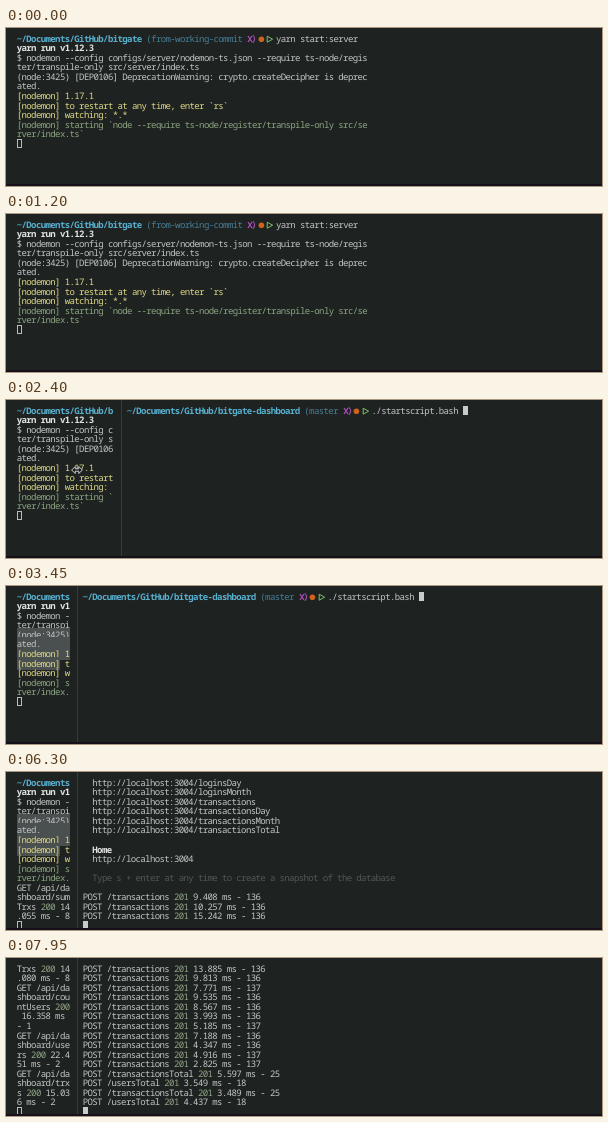
Animation of 596x158 px, one loop 8000 ms. Source, as an HTML page:

```html
<!DOCTYPE html>
<html lang="en">
<head>
<meta charset="utf-8">
<title>Split terminal</title>
<style>
html, body { margin: 0; width: 100%; height: 100%; overflow: hidden; background: #1e2322; }
#stage { position: relative; width: 596px; height: 158px; overflow: hidden; background: #1e2322; }
.pane {
  position: absolute; top: 5.7px; white-space: pre; color: #c3c7c4;
  font: 9px "Noto Sans Mono", "DejaVu Sans Mono", monospace;
  letter-spacing: -.6px;
  text-rendering: geometricPrecision; font-variant-ligatures: none;
}
.pane div { height: 9.55px; line-height: 9.55px; }
#left { left: 10.7px; }
#divider { position: absolute; top: 0; width: 1px; height: 156px; background: #363c3c; }
#edge { position: absolute; left: 0; top: 156px; width: 596px; height: 2px; background: #15101a; }
#pointer { position: absolute; left: -6px; top: 65px; }
.path { color: #58b0cf; font-weight: 600; }
.branch { color: #477f98; }
.bold { color: #e2e4e2; font-weight: 700; }
.yellow { color: #e0da88; font-weight: 500; }
.green { color: #8da581; }
.status { color: #93a587; }
.dim { color: #525858; }
.sel { background: #4a4f4f; }
.icon, .block, .hollow { display: inline-block; width: 4.8px; height: 9px; vertical-align: top; }
.icon svg { display: block; overflow: visible; }
.block { width: 5.5px; background: #c9cdca; }
.hollow { box-sizing: border-box; width: 5.5px; border: 1px solid #b9bdba; }
</style>
</head>
<body>
<div id="stage">
  <div id="left" class="pane"></div>
  <div id="right" class="pane"></div>
  <div id="divider"></div>
  <div id="edge"></div>
  <svg id="pointer" width="12" height="10" viewBox="0 0 12 10">
    <path d="M.7 5 4.2 1.5V3.8H7.8V1.5L11.3 5 7.8 8.5V6.2H4.2V8.5Z" fill="#161919" stroke="#e4e6e4" stroke-width=".9"/>
  </svg>
</div>
<script>
const LOOP = 8000, STEP = 150, CELL = 4.8, ROWS = 16, RIGHT_EDGE = 692;
const $ = id => document.getElementById(id);

// A line is a list of cells: [character, class names].
const seg = (text, cls = '') => [...text].map(ch => [ch, cls]);
const blank = () => [];

const svg = shape => `<svg width="5" height="9" fill="none">${shape}</svg>`;
const ICONS = {
  cross: svg('<path d="M1 2 5 8M5 2 1 8" stroke="#b04bb8" stroke-width="1.3"/>'),
  paren: svg('<path d="M.8 1Q4.4 4.9 .8 9" stroke="#9a52ab" stroke-width="1.1"/>'),
  dot: svg('<circle cx="4.4" cy="5.2" r="2.8" fill="#d0621c"/>'),
  arrow: svg('<path d="M1.2 2.2 6.6 5.2 1.2 8.2Z" stroke="#79c069" stroke-width="1"/>')
};
const icon = name => [['', 'icon ' + name]];

const prompt = (path, branch, command) => [
  ...seg(path, 'path'), ...seg(' '), ...seg('(' + branch, 'branch'), ...seg(' '),
  ...icon('cross'), ...icon('paren'), ...icon('dot'), ...seg(' '),
  ...icon('arrow'), ...seg(' '), ...seg(command)
];

const wrap = (cells, cols) => {
  const rows = [];
  for (let i = 0; i < cells.length; i += cols) rows.push(cells.slice(i, i + cols));
  return rows.length ? rows : [[]];
};

const rowHtml = cells => {
  let html = '', run = '', last = '';
  const flush = () => { if (run) html += `<span class="${last}">${run}</span>`; run = ''; };
  for (const [ch, cls] of cells) {
    if (ch === '') {
      flush();
      html += `<span class="${cls}">${ICONS[cls.split(' ')[1]] || ''}</span>`;
      continue;
    }
    if (cls !== last) { flush(); last = cls; }
    run += ch;
  }
  flush();
  return `<div>${html}</div>`;
};

const show = (pane, rows) => { pane.innerHTML = rows.slice(-ROWS).map(rowHtml).join(''); };

const select = (cells, count) => {
  const padded = [...cells, ...seg(' '.repeat(Math.max(0, count - cells.length)))];
  return padded.map(([ch, cls], i) => [ch, i < count ? cls + ' sel' : cls]);
};

// Left pane: dev server
const server = [
  prompt('~/Documents/GitHub/bitgate', 'from-working-commit', 'yarn start:server'),
  seg('yarn run v1.12.3', 'bold'),
  seg('$ nodemon --config configs/server/nodemon-ts.json --require ts-node/regis'),
  seg('ter/transpile-only src/server/index.ts'),
  seg('(node:3425) [DEP0106] DeprecationWarning: crypto.createDecipher is deprec'),
  seg('ated.'),
  seg('[nodemon] 1.17.1', 'yellow'),
  seg('[nodemon] to restart at any time, enter `rs`', 'yellow'),
  seg('[nodemon] watching: *.*', 'yellow'),
  seg('[nodemon] starting `node --require ts-node/register/transpile-only src/se', 'green'),
  seg('rver/index.ts`', 'green')
];
const SELECTION = { 4: 11, 5: 11, 6: 11, 7: 9 };

const requests = [
  ['sumTrxs', '14.055 ms - 8'], ['users', '27.877 ms - 357'],
  ['jwts', '30.516 ms - 2'], ['trxs', '32.310 ms - 2147'],
  ['sumTrxs', '14.080 ms - 8'], ['countUsers', '16.358 ms - 1'],
  ['users', '22.451 ms - 2'], ['trxs', '15.036 ms - 2']
].flatMap(([name, timing]) => wrap([
  ...seg(`GET /api/dashboard/${name} `), ...seg('200', 'status'), ...seg(' ' + timing)
], 11));

// Right pane: mock API
const post = (route, ms, size) => [
  ...seg(`POST /${route} `), ...seg('201', 'status'), ...seg(` ${ms} ms - ${size}`)
];
const routes = 'usersDay usersMonth usersTotal logins loginsDay loginsMonth transactions transactionsDay transactionsMonth transactionsTotal';
const timings = '9.408 10.257 15.242 11.679 13.885 9.813 7.771 9.535 8.567 3.993 5.185 7.188 4.347 4.916 2.825';
const api = [
  prompt('~/Documents/GitHub/bitgate-dashboard', 'master', './startscript.bash '),
  ...routes.split(' ').map(r => seg('  http://localhost:3004/' + r)),
  blank(),
  seg('  Home', 'bold'),
  seg('  http://localhost:3004'),
  blank(),
  seg('  Type s + enter at any time to create a snapshot of the database', 'dim'),
  blank(),
  ...timings.split(' ').map((ms, i) => post('transactions', ms, [6, 10, 13, 14].includes(i) ? 137 : 136)),
  post('transactionsTotal', '5.597', 25),
  post('usersTotal', '3.549', 18),
  post('transactionsTotal', '3.489', 25),
  post('usersTotal', '4.437', 18)
];

// Timelines: [start in ms, value], held until the next entry
const requestRows = [[0, 0], [6300, 4], [6450, 8], [6600, 12], [6750, 16],
  [7200, 20], [7350, 25], [7500, 29], [7950, 33]];
const apiRows = [[0, 0], [4050, 1], [4350, 6], [4500, 11], [4650, 16], [6300, 20], [6450, 24],
  [6600, 28], [6750, 32], [7200, 33], [7350, 34], [7500, 35], [7650, 36]];
const pointerX = [[0, null], [1650, 503], [1800, 398], [1950, 290], [2100, 190],
  [2250, 115], [2400, 71], [2700, null]];
const dividerX = [[0, 640], [1650, 580], [1800, 503], [1950, 398], [2100, 290],
  [2250, 190], [2400, 115], [2550, 71]];
const at = (line, t) => line.filter(([start]) => start <= t).pop()[1];

function render(t) {
  const split = at(dividerX, t), mouse = at(pointerX, t);

  const leftCols = Math.floor((split - 17) / CELL);
  const top = server.map((cells, i) => {
    const clipped = cells.slice(0, leftCols);
    return t >= 2700 && SELECTION[i] ? select(clipped, SELECTION[i]) : clipped;
  });
  show($('left'), [...top, ...requests.slice(0, at(requestRows, t)), [['', 'hollow']]]);

  const rightCols = Math.floor((RIGHT_EDGE - split - 6) / CELL);
  const count = at(apiRows, t), cursor = ['', 'block'];
  const lines = count ? [...api.slice(0, count), [cursor]] : [[...api[0], cursor]];
  show($('right'), lines.flatMap(cells => wrap(cells, rightCols)));

  $('right').style.left = split + 5.7 + 'px';
  $('divider').style.left = split + 'px';
  $('pointer').style.display = mouse === null ? 'none' : 'block';
  $('pointer').style.transform = `translateX(${mouse || 0}px)`;
}

let shown = -1;
function tick() {
  const step = Math.floor(performance.now() % LOOP / STEP);
  if (step !== shown) render((shown = step) * STEP);
  requestAnimationFrame(tick);
}
tick();
</script>
</body>
</html>
```
